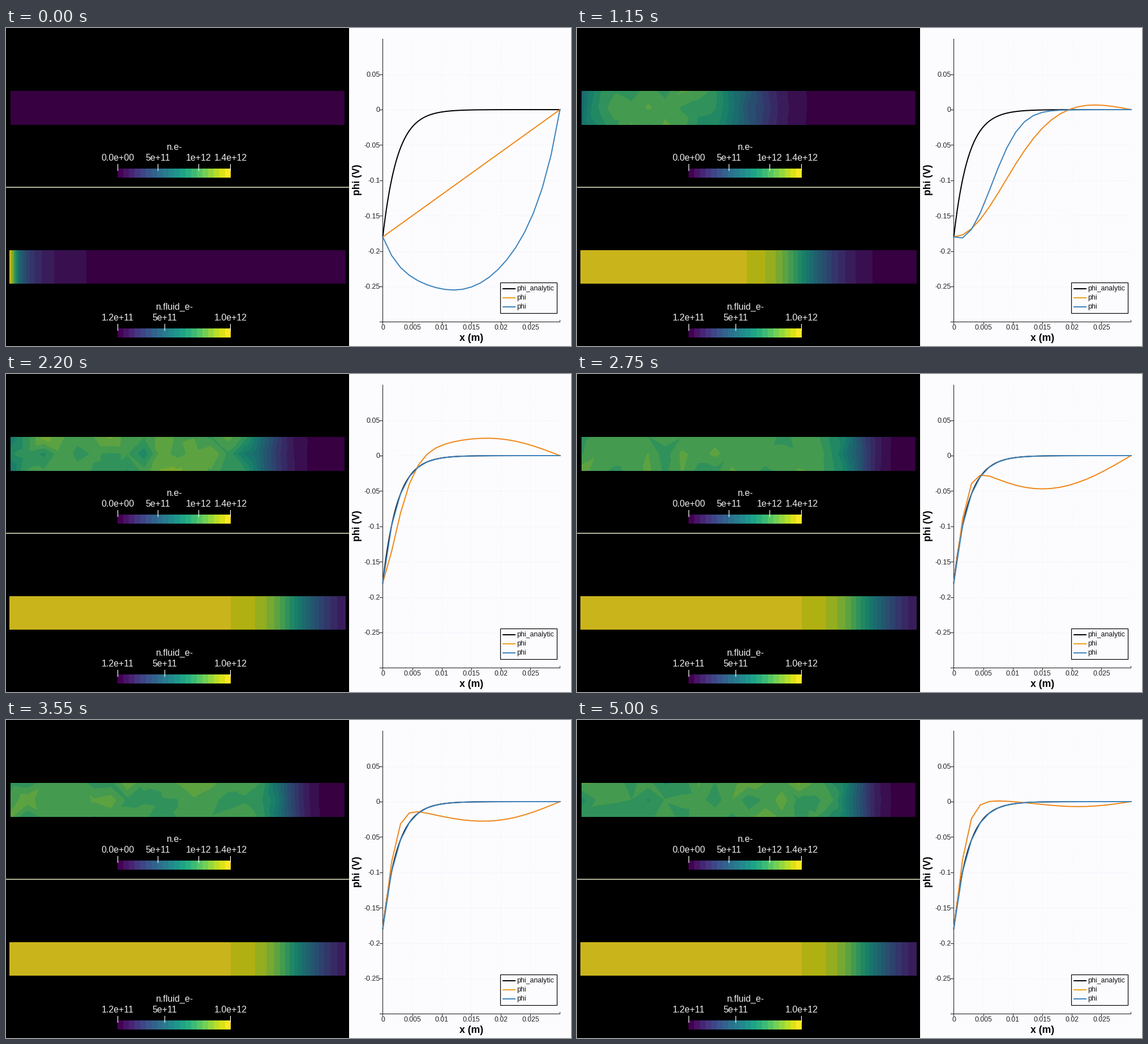
Write a matplotlib script that moves like this. It is 998 px wide and 561 px high and loops after 5050 ms.

```python
import matplotlib
import matplotlib.pyplot as plt
import numpy as np
from matplotlib.animation import FuncAnimation
from matplotlib.patches import Rectangle

W, H, DPI = 998, 561, 100
FRAMES, STEP = 101, 50
ORANGE, BLUE = "#f0881a", "#3f84bc"
LEVELS = 20
VIRIDIS = matplotlib.colormaps["viridis"](np.linspace(0, 1, LEVELS))[:, :3]
SHADED = VIRIDIS * [0.80, 0.78, 0.78]

# Plot geometry
X0, X1, Y_ZERO = 665, 978, 143.5
LENGTH = 0.03
U = np.linspace(0, 1, 21)

# Frames at which filling ends, and at which the density settles
FILL, REACH, SETTLE = 15, 32, 55


def px(x):
    return X0 + x * (X1 - X0) / LENGTH


def py(v):
    return Y_ZERO - v * 1248


def sheath(u, width, power):
    def raw(r):
        return -0.18 * np.exp(-(r * LENGTH / width) ** power)
    return raw(u) - raw(1) * u


def mode(n):
    return np.sin(n * np.pi * U)


# Smooth arch of the first fluid potential through a few points
arch = np.polyval(np.polyfit([0, 0.2, 0.4, 0.6, 0.75, 0.9, 1],
                             [-0.18, -0.242, -0.255, -0.237, -0.195, -0.111, 0],
                             6), U)


def fluid_potential(i):
    stage = [FILL, REACH]
    curve = sheath(U, np.interp(i, stage, [0.0131, 0.0025]),
                   np.interp(i, stage, [3.5, 1]))
    r = U * LENGTH / 0.0035
    curve -= np.interp(i, stage, [0.012, 0]) * r * np.exp(1 - r)
    start = max(0, 1 - i / FILL)
    return start * arch + (1 - start) * curve


def particle_potential(i):
    stage = [FILL, REACH, SETTLE]
    curve = sheath(U, np.interp(i, stage, [0.0172, 0.0058, 0.0018]),
                   np.interp(i, stage, [2.4, 1.6, 1.33]))
    # Plasma oscillation as two slowly swinging standing waves
    beats = [FILL, REACH, 43, SETTLE, 63, 71, 86, 100]
    curve += mode(1) * np.interp(
        i, beats, [0, 0.02, 0.03, -0.047, -0.005, -0.027, 0.001, -0.004])
    curve += mode(2) * np.interp(
        i, beats, [0, -0.008, -0.004, 0, 0.002, 0.003, -0.003, 0.004])
    start = max(0, 1 - i / FILL)
    return start * 0.18 * (U - 1) + (1 - start) * curve


def front(x, middle, steep):
    return 1 / (1 + (x / middle) ** steep)


def shade(v):
    return SHADED[np.clip((v * LEVELS).astype(int), 0, LEVELS - 1)]


def fluid_image(i):
    x = np.arange(594) + 0.5
    stage = [0, FILL, REACH]
    middle = np.interp(i, stage, [18, 312, 524])
    v = front(x, middle, np.interp(i, stage, [1.4, 9.5, 16]))
    return shade(v * (1 - 0.1 * np.minimum(x / middle, 1) ** 3))[None]


# Linear interpolation over a triangulated 20 x 2 mesh
CELL, NOISE_STEP = 29.5, 4
GX = np.arange(21) * CELL
noise = np.random.default_rng(7).normal(0, 0.045, (27, 3, 21))
gu, gv = np.meshgrid((np.arange(590) + 0.5) / CELL, (np.arange(60) + 0.5) / 30)
ci, cj = gu.astype(int), gv.astype(int)
fu, fv = gu - ci, gv - cj
flip = (ci + cj) % 2 == 1
tu = np.where(flip, 1 - fu, fu)
left, right = np.where(flip, ci + 1, ci), np.where(flip, ci, ci + 1)


def mesh_fill(n):
    a, b = n[cj, left], n[cj, right]
    c, d = n[cj + 1, left], n[cj + 1, right]
    lower = a + fv * (c - a) + tu * (d - c)
    upper = a + tu * (b - a) + fv * (d - b)
    return np.where(tu > fv, upper, lower)


def particle_image(i):
    stage = [0, FILL, REACH, SETTLE]
    x = gu * CELL
    dense = front(x, np.interp(i, stage, [1, 190, 416, 490]),
                  np.interp(i, stage, [6, 6, 12, 24]))
    q, r = divmod(i, NOISE_STEP)
    rough = mesh_fill(noise[q] + (noise[q + 1] - noise[q]) * r / NOISE_STEP)
    thin = np.interp(i, [REACH, SETTLE], [0.25, 0]) * np.exp(-x / 22)
    return shade(dense * min(1, i / 4) * (0.72 + rough - thin))


fig = plt.figure(figsize=(W / DPI, H / DPI), dpi=DPI, facecolor="black")
ax = fig.add_axes([0, 0, 1, 1])


def pt(p):
    return p * 72 / DPI


def text(x, y, s, size, color="black", **kw):
    kw = {"ha": "center", "va": "center_baseline", **kw}
    ax.text(x, y, s, fontsize=pt(size), color=color, family="Liberation Sans", **kw)


def line(xs, ys, color, width=1.0, **kw):
    return ax.plot(xs, ys, color=color, lw=pt(width), **kw)[0]


def picture(data, x0, x1, y0, y1):
    return ax.imshow(data, extent=(x0, x1, y1, y0), aspect="auto",
                     interpolation="nearest", zorder=2)


def color_bar(top, title, labels):
    picture(VIRIDIS[None], 196.5, 396.5, top, top + 16)
    text(297, top - 39, title, 16, "#eeeeee")
    for x, s in labels:
        line([x, x], [top - 8, top + 3], "white", 1.2, zorder=3)
        text(x, top - 20, s, 16, "#eeeeee")


# Left: density views
color_bar(247.5, "n.e-", [(197, "0.0e+00"), (268, "5e+11"),
                          (340, "1e+12"), (396, "1.4e+12")])
color_bar(529.5, "n.fluid_e-", [(197, "1.2e+11"), (280, "5e+11"),
                                (396, "1.0e+12")])
line([0, 605], [281, 281], "#dcdcc0", 1.6)
part_img = picture(particle_image(0), 7.5, 597.5, 110.5, 170.5)
fluid_img = picture(fluid_image(0), 5.5, 599.5, 391.5, 450.5)

# Right: potential plot
ax.add_patch(Rectangle((605.5, -1), W, H + 2, color="#fcfcff", lw=0, zorder=0))
dots = {"linestyle": (0, (1, 2.5)), "zorder": 1}
for n in range(-5, 2):
    y = py(n * 0.05)
    line([X0, X1], [y, y], "#e2e2f4", **dots)
    line([X0 - 5, X0], [y, y], "#222222")
    text(660, y, f"{n * 0.05:.2g}", 12.5, "#222222", ha="right")
for n in range(6):
    x = px(n * 0.005)
    if n:
        line([x, x], [19, 518], "#eeeee4", **dots)
    line([x, x], [518, 522], "#222222")
    text(x, 527.5, f"{n * 0.005:g}", 12.3, "#222222")
line([X0, X0], [19, 518], "#333333", 1.2)
line([X0 - 5, X1], [518, 518], "#333333", 1.2)
line([X1, X1], [515, 518], "#333333")
text(821.5, 545, "x (m)", 17.6, weight="bold")
text(620.5, 267.5, "phi (V)", 17.6, weight="bold", rotation=90, va="center")

fine = np.linspace(0, 1, 150)
line(px(fine * LENGTH), py(sheath(fine, 0.0025, 1)), "black", 2, zorder=4)
orange_line = line(px(U * LENGTH), py(particle_potential(0)), ORANGE, 2, zorder=5)
blue_line = line(px(U * LENGTH), py(fluid_potential(0)), BLUE, 2, zorder=6)

ax.add_patch(Rectangle((873, 449), 100, 54, fc="#fcfcff", ec="black",
                       lw=pt(1.2), zorder=7))
for y, s, c in [(459.5, "phi_analytic", "black"), (475.5, "phi", "#eda01e"),
                (491.5, "phi", BLUE)]:
    line([878, 899], [y, y], c, 2, zorder=8)
    text(902, y - 1, s, 12.4, "#111111", ha="left", zorder=8)

# Whole numbers fall on pixel centres
ax.set_xlim(-0.5, W - 0.5)
ax.set_ylim(H - 0.5, -0.5)
ax.axis("off")


def update(i):
    orange_line.set_ydata(py(particle_potential(i)))
    blue_line.set_ydata(py(fluid_potential(i)))
    part_img.set_data(particle_image(i))
    fluid_img.set_data(fluid_image(i))
    return orange_line, blue_line, part_img, fluid_img


anim = FuncAnimation(fig, update, frames=FRAMES, interval=STEP,
                     repeat=True, repeat_delay=0, blit=False)
plt.show()
```
